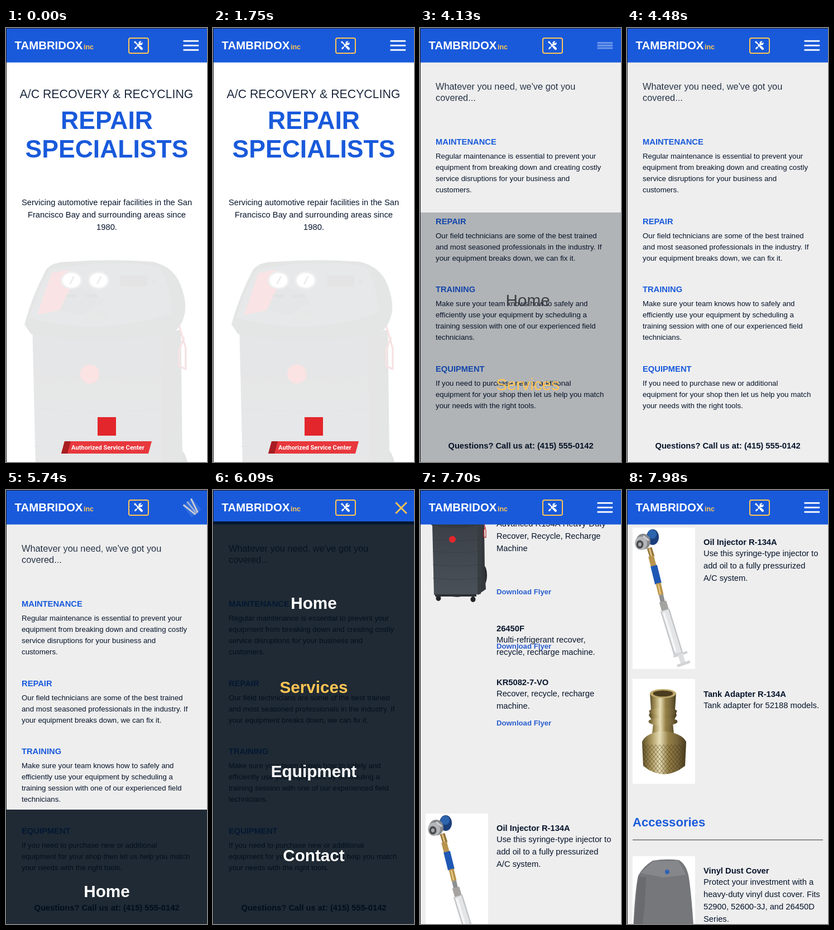
An HTML page with a canvas for the animation above (8 s loop, 360 by 774 pixels).

```html
<!DOCTYPE html>
<html lang="en">
<head>
<meta charset="utf-8">
<title>Mobile site menu</title>
<style>
html, body { margin: 0; width: 100%; height: 100%; overflow: hidden; background: #fff; }
canvas { display: block; width: 360px; height: 774px; }
</style>
</head>
<body>
<canvas id="stage"></canvas>
<script>
const W = 360, H = 774, LOOP = 8000, STEP = 70;
const BLUE = '#195adb', GOLD = '#ffc555', INK = '#06142b', PALE = '#eeeeee', RED = '#e3262c', EDGE = '#1c1c1e';
const HEADER = 61.5, MENU_TOP = 56, BODY = 14.72;
const SANS = '"Liberation Sans", Arial, sans-serif';
const PHONE = ['(415)', '555-0142'];

const canvas = document.getElementById('stage');
const dpr = window.devicePixelRatio || 1;
canvas.width = W * dpr;
canvas.height = H * dpr;
let g = canvas.getContext('2d');

// ---------- helpers ----------
const clamp = v => Math.max(0, Math.min(1, v));
const lerp = (a, b, u) => a + (b - a) * u;

// cubic-bezier(.25, .1, .25, 1)
function ease(x) {
  if (x <= 0) return 0;
  if (x >= 1) return 1;
  const bez = (a, b, s) => 3 * a * s * (1 - s) ** 2 + 3 * b * s * s * (1 - s) + s ** 3;
  let lo = 0, hi = 1;
  for (let i = 0; i < 24; i++) {
    const mid = (lo + hi) / 2;
    if (bez(0.25, 0.25, mid) < x) lo = mid; else hi = mid;
  }
  return bez(0.1, 1, lo);
}

function text(s, x, y, { size = BODY, color = INK, bold = false, align = 'left', font = SANS, thin = null } = {}) {
  g.font = `${bold ? 'bold ' : ''}${size}px ${font}`;
  g.textAlign = align;
  g.fillStyle = color;
  g.fillText(s, x, y);
  if (thin) { // shave the outline for a light weight
    g.strokeStyle = thin;
    g.lineWidth = 0.22;
    g.lineJoin = 'round';
    g.strokeText(s, x, y);
  }
}

function lines(list, x, y, gap, opt) {
  list.forEach((s, i) => text(s, x, y + i * gap, opt));
}

function rect(x, y, w, h, color) {
  g.fillStyle = color;
  g.fillRect(x, y, w, h);
}

function poly(color, ...p) {
  g.beginPath();
  for (let i = 0; i < p.length; i += 2) g.lineTo(p[i], p[i + 1]);
  g.closePath();
  g.fillStyle = color;
  g.fill();
}

function oval(x, y, rx, ry, color) {
  g.beginPath();
  g.ellipse(x, y, rx, ry, 0, 0, 7);
  g.fillStyle = color;
  g.fill();
}

function stroke(color, width, ...p) {
  g.beginPath();
  for (let i = 0; i < p.length; i += 2) g.lineTo(p[i], p[i + 1]);
  g.strokeStyle = color;
  g.lineWidth = width;
  g.stroke();
}

function box(x, y, w, h, r) {
  g.beginPath();
  g.roundRect(x, y, w, h, r);
}

function blend(x0, y0, x1, y1, ...colors) {
  const grad = g.createLinearGradient(x0, y0, x1, y1);
  colors.forEach((c, i) => grad.addColorStop(i / (colors.length - 1), c));
  return grad;
}

// ---------- pictures ----------
function heavyMachine() {
  oval(97, 135, 6, 17, '#26282b');
  poly('#34383c', 92, 45, 98, 43, 99, 128, 101, 160, 92, 166);
  poly(blend(0, 44, 0, 174, '#3a4046', '#434950', '#4b5158'), 5, 44, 94, 44, 92, 168, 50, 174, 8, 170);
  poly('#383d42', 86, 44, 94, 44, 92, 168, 86, 170);
  [71, 92, 116, 140].forEach(y => {
    g.beginPath();
    g.moveTo(6, y);
    g.quadraticCurveTo(48, y + 5, 92, y);
    g.strokeStyle = '#353a3f';
    g.lineWidth = 0.6;
    g.stroke();
  });
  g.beginPath();
  g.moveTo(0, 40);
  g.quadraticCurveTo(5, 22, 13, 7);
  g.quadraticCurveTo(16, 1, 28, 1);
  g.quadraticCurveTo(55, -1, 80, 1);
  g.quadraticCurveTo(95, 4, 99, 19);
  g.quadraticCurveTo(104, 34, 95, 44);
  g.quadraticCurveTo(50, 56, 4, 46);
  g.closePath();
  g.fillStyle = '#34393d';
  g.fill();
  g.beginPath();
  g.moveTo(3, 36);
  g.quadraticCurveTo(9, 17, 16, 6);
  g.quadraticCurveTo(50, -1, 84, 4);
  g.quadraticCurveTo(91, 14, 92, 33);
  g.quadraticCurveTo(48, 48, 3, 36);
  g.fillStyle = '#4b5055';
  g.fill();
  poly('#d62b2f', 17, 8, 27, 6, 30, 15, 37, 23, 28, 30, 8, 34);
  poly('#3c4146', 30, 15, 44, 20, 50, 26, 37, 34, 22, 31);
  [29.5, 46.5].forEach(x => {
    oval(x, 12.6, 6.8, 5.6, '#84888c');
    oval(x, 12.6, 5.6, 4.6, '#ffffff');
    stroke('#444', 0.7, x - 1, 15, x + 1.5, 10);
  });
  rect(60, 9.5, 17, 7, '#2f3337');
  rect(80, 12, 2, 3, '#33383c');
  rect(26, 21.5, 7, 1.6, '#1d2023');
  rect(38, 21.5, 8, 1.6, '#1d2023');
  poly('#42474c', 41, 33, 45, 31, 52, 31, 51, 36, 38, 37);
  g.lineJoin = 'round';
  stroke('#c3262a', 1.2, 97, 41, 101, 55, 101, 68, 97, 66, 97, 56, 100, 48);
  oval(41, 71, 6, 6, RED);
  oval(16, 176, 4.5, 5, '#222427');
  oval(78, 178, 4.5, 5, '#222427');
  rect(10, 169, 74, 4, '#2c3034');
}

// pre-rendered so it fades as one picture
const ghost = document.createElement('canvas');
ghost.width = W * dpr;
ghost.height = H * dpr;
{
  const main = g;
  g = ghost.getContext('2d');
  g.scale(dpr, dpr);
  g.translate(33, 414);
  g.scale(2.86, 2.86);
  heavyMachine();
  g = main;
}

function slimMachine() {
  oval(104, 378, 9, 15, '#1d1f21');
  oval(106, 378, 4, 7, '#5a5d60');
  poly(blend(22, 0, 101, 0, '#6d7176', '#96999e', '#8d9196', '#74787d'),
    25, 288, 96, 282, 101, 300, 102, 345, 97, 390, 78, 406, 27, 396, 21, 345);
  poly('#23262a', 30, 298, 68, 299, 75, 325, 71, 352, 80, 404, 27, 396, 33, 352, 28, 325);
  poly('#2a2d31', 25, 291, 37, 261, 58, 257, 94, 259, 108, 281, 100, 291, 74, 300, 26, 298);
  poly('#55595e', 40, 264, 88, 262, 97, 282, 72, 290, 32, 288);
  poly('#2c2f33', 62, 266, 86, 265, 92, 280, 64, 284);
  poly('#c52b2f', 41, 265, 60, 264, 57, 284, 34, 287);
  oval(47, 270, 4, 3.4, '#fff');
  oval(55, 269, 3.6, 3.2, '#fff');
  oval(45, 294, 3, 3, RED);
  poly(blend(37, 0, 62, 0, '#b9bdc1', '#ffffff', '#a3a7ab'), 37, 317, 62, 316, 60, 339, 53, 343, 42, 341);
  stroke('#53575c', 1, 34, 352, 71, 356);
  stroke('#53575c', 1, 32, 366, 73, 372);
  [30, 77].forEach((x, i) => {
    rect(x - 7, 396 + i * 5, 14, 4, '#2a2c2f');
    oval(x, 406 + i * 5, 5, 6, '#1f2123');
  });
  oval(98, 398, 4, 5, '#1f2123');
}

function injector() {
  rect(10, 67, 112, 252, '#fff');
  oval(46, 84, 11, 14, '#1b3f7c');
  oval(45, 79, 8, 8, '#2c64ad');
  oval(29, 92, 13, 14, '#85888b');
  oval(25, 95, 11, 12, '#b4b6b8');
  oval(23, 97, 6.5, 7.5, '#4a4c4f');
  oval(23, 97, 3, 3.5, '#a5a7a9');
  stroke('#cfd1d3', 3, 29, 82, 39, 90);
  stroke('#94733a', 9, 40, 103, 45, 119);
  stroke('#dcc080', 3, 40, 104, 44, 118);
  stroke('#b8954d', 10, 43, 118, 48, 137);
  stroke('#1f58b4', 12, 48, 135, 56, 167);
  stroke('#b8924a', 9, 56, 166, 61, 187);
  stroke('#e2c47c', 3, 56, 168, 60, 186);
  stroke('#8d8f92', 8, 61, 187, 64, 200);
  stroke('#a5a39f', 13, 64, 199, 69, 216);
  stroke('#c4c7ca', 17, 68, 214, 92, 292);
  stroke('#e3e5e7', 12, 68, 215, 92, 291);
  stroke('#f5f6f6', 4, 66, 219, 87, 288);
  stroke('#cfd1d4', 4, 83, 297, 108, 289);
  stroke('#dcdee0', 9, 95, 292, 101, 310);
  stroke('#d2d4d6', 5, 90, 314, 113, 306);
}

function adapter() {
  rect(10, 337, 112, 187, '#fff');
  const brass = (a, b) => blend(a, 0, b, 0, '#5d4f29', '#a8955c', '#e8deb6', '#947f46', '#77653a', '#483c1e');
  poly(brass(41, 88), 41, 362, 88, 362, 86, 392, 89, 402, 82, 414, 84, 436, 45, 436, 47, 414, 39, 402, 43, 392);
  oval(64.5, 363, 23.5, 8, '#bfa96c');
  oval(64.5, 363, 18, 5.5, '#4b3d1f');
  oval(64.5, 395, 25, 7, brass(39, 90));
  oval(64.5, 413, 26, 7, brass(38, 91));
  g.beginPath();
  g.moveTo(27, 449);
  g.quadraticCurveTo(34, 433, 64, 430);
  g.quadraticCurveTo(98, 433, 106, 449);
  g.lineTo(104, 492);
  g.quadraticCurveTo(66, 522, 29, 492);
  g.closePath();
  g.fillStyle = brass(27, 106);
  g.fill();
  g.save();
  g.clip();
  for (let x = -40; x < 150; x += 7) {
    stroke('rgba(62,46,16,.5)', 1, x, 454, x + 50, 514);
    stroke('rgba(62,46,16,.5)', 1, x + 50, 454, x, 514);
  }
  g.restore();
}

function cover() {
  rect(10, 653, 112, 190, '#fff');
  g.beginPath();
  g.moveTo(10, 810);
  g.quadraticCurveTo(13, 720, 20, 688);
  g.quadraticCurveTo(28, 672, 46, 661);
  g.quadraticCurveTo(70, 657, 93, 660);
  g.quadraticCurveTo(107, 668, 111, 692);
  g.quadraticCurveTo(117, 735, 121, 810);
  g.closePath();
  g.fillStyle = '#75777b';
  g.fill();
  poly('#85878b', 24, 683, 47, 662, 92, 661, 106, 686, 66, 691);
  poly('#696b6f', 20, 690, 34, 690, 32, 740, 24, 810, 10, 810);
  oval(72, 681, 4, 4, '#2f63b5');
}

// ---------- pages ----------
function home() {
  rect(0, 0, W, H, '#fff');
  g.globalAlpha = 0.125;
  g.drawImage(ghost, 0, 0, W, H);
  g.globalAlpha = 1;
  const mid = { align: 'center' };
  text('A/C RECOVERY & RECYCLING', 180, 125, { ...mid, size: 21.3, thin: '#fff' });
  const title = { ...mid, size: 44.5, bold: true, color: BLUE };
  text('REPAIR', 180.5, 180, title);
  text('SPECIALISTS', 180.5, 231, title);
  lines(['Servicing automotive repair facilities in the San',
    'Francisco Bay and surrounding areas since', '1980.'], 180.5, 316, 22, mid);
  rect(164, 694, 33, 33, RED);
  poly('#e8383d', 105, 737, 261, 737, 255, 759, 99, 759);
  poly('#a81e22', 105, 737, 116, 737, 110, 759, 99, 759);
  text('Authorized Service Center', 182.5, 752, { ...mid, size: 11.1, bold: true, color: '#fff', font: 'Roboto, sans-serif' });
}

const topics = [
  [208, 'MAINTENANCE', 'Regular maintenance is essential to prevent your',
    'equipment from breaking down and creating costly', 'service disruptions for your business and', 'customers.'],
  [350, 'REPAIR', 'Our field technicians are some of the best trained',
    'and most seasoned professionals in the industry. If', 'your equipment breaks down, we can fix it.'],
  [471, 'TRAINING', 'Make sure your team knows how to safely and',
    'efficiently use your equipment by scheduling a', 'training session with one of our experienced field', 'technicians.'],
  [613, 'EQUIPMENT', 'If you need to purchase new or additional',
    'equipment for your shop then let us help you match', 'your needs with the right tools.']
];

function services() {
  rect(0, 0, W, H, PALE);
  lines(["Whatever you need, we've got you", 'covered...'], 28, 110, 19.5, { size: 16.35, thin: PALE });
  for (const [y, head, ...body] of topics) {
    text(head, 28, y, { bold: true, color: BLUE });
    lines(body, 28, y + 25, 20, { size: 13.25 });
  }
  text('Questions? Call us at: ' + PHONE.join(' '), 180.5, 750, { bold: true, align: 'center' });
}

function item(y, name, body, flyer) {
  text(name, 137, y, { bold: true });
  lines(body, 137, y + 19.5, 22, {});
  if (flyer) text('Download Flyer', 137, flyer, { size: 13.2, bold: true, color: '#2a5fd0' });
}

function section(name, y) {
  text(name, 10, y, { size: 22.1, bold: true, color: BLUE });
  rect(10, y + 23.5, 341, 2, '#8c8c8c');
}

const SCROLL = 940;

function equipment(t) {
  const u = clamp((t - 7600) / 380);
  rect(0, 0, W, H, PALE);
  g.save();
  g.translate(0, -Math.round(SCROLL * (1 - (1 - u) ** 2)));
  box(27.5, 79, 306, 76, 22);
  g.fillStyle = BLUE;
  g.fill();
  lines(['Give us a call to inquire about', 'pricing, financing options, and', 'to place an order.'],
    134, 105, 15, { size: 12.5, color: GOLD, align: 'center' });
  lines(PHONE, 285, 113, 17, { bold: true, color: GOLD, align: 'center' });
  section('A/C Machines', 202);
  slimMachine();
  item(286, '52619KE', ['Premier R-134A refrigerant', 'recovery, recycling, and', 'recharging machine.'], 409);
  g.save();
  g.translate(17, 447);
  heavyMachine();
  g.restore();
  item(475, '52731TB', ['Advanced R134A Heavy-Duty', 'Recover, Recycle, Recharge', 'Machine'], 616);
  item(682, '26450F', ['Multi-refrigerant recover,', 'recycle, recharge machine.'], 713);
  item(778, 'KR5082-7-VO', ['Recover, recycle, recharge', 'machine.'], 850);

  g.translate(0, SCROLL);
  injector();
  item(98, 'Oil Injector R-134A', ['Use this syringe-type injector to', 'add oil to a fully pressurized', 'A/C system.']);
  adapter();
  item(369, 'Tank Adapter R-134A', ['Tank adapter for 52188 models.']);
  section('Accessories', 599.5);
  cover();
  item(684, 'Vinyl Dust Cover', ['Protect your investment with a', 'heavy-duty vinyl dust cover. Fits', '52900, 52600-3J, and 26450D', 'Series.']);
  g.restore();
}

// ---------- header and menu ----------
// head: time already spent in the slide at the first visible step
const moves = [
  { at: 2240, open: true, head: 78 },
  { at: 4130, open: false, head: 95, icon: 120 },
  { at: 5740, open: true, head: 78 },
  { at: 7350, open: false, head: 38, icon: 0 }
];

function bars(gap, tilt, midAlpha, color) {
  g.strokeStyle = color;
  g.lineWidth = 2.8;
  const alpha = g.globalAlpha;
  for (const i of [-1, 0, 1]) {
    g.save();
    g.globalAlpha = i ? alpha : alpha * midAlpha;
    g.translate(0, i * gap);
    g.rotate(-i * tilt);
    g.beginPath();
    g.moveTo(-13.8, 0);
    g.lineTo(13.8, 0);
    g.stroke();
    g.restore();
  }
}

function menuIcon(move, t) {
  g.save();
  const dt = move ? t - move.at : 0;
  if (move && move.open) {
    const p = ease((dt + move.head) / 400);
    const busy = 4 * p * (1 - p);
    g.translate(lerp(331.3, 337, p), lerp(31.2, 32, p));
    g.rotate(Math.PI * p);
    rect(-13, -11, 26, 22, `rgba(255,255,255,${0.13 * busy})`);
    g.globalAlpha = 1 - 0.3 * busy;
    bars(8 * (1 - p), Math.PI / 4 * p, 1 - p, `rgb(255,${lerp(255, 197, p)},${lerp(255, 85, p)})`);
  } else {
    const k = move ? clamp((dt + move.icon) / 350) : 1;
    const gap = 8 * (0.4 + 0.6 * k);
    g.translate(331.3, 31.2);
    if (k < 1) rect(-13.8, -gap, 27.6, 2 * gap, `rgba(255,255,255,${0.12 * (1 - k)})`);
    g.globalAlpha = k;
    bars(gap, 0, 1, '#fff');
  }
  g.restore();
}

function header(move, t) {
  rect(0, 0, W, HEADER, BLUE);
  text('TAMBRIDOX', 15.5, 38, { size: 20.4, bold: true, color: '#fff' });
  text('inc', 139, 38, { size: 12.4, bold: true, color: GOLD });
  box(220, 18, 35, 27, 3);
  g.strokeStyle = GOLD;
  g.lineWidth = 2;
  g.stroke();
  // crossed wrench and screwdriver
  g.lineCap = 'round';
  stroke('#fff', 2.8, 231.5, 36.5, 240, 28);
  oval(241, 27, 3.6, 3.6, '#fff');
  stroke(BLUE, 2, 241.8, 26.2, 245, 23);
  stroke(BLUE, 1.2, 232, 31, 237, 36);
  stroke('#fff', 1.8, 231.5, 25.5, 238, 32);
  stroke('#fff', 3, 230.8, 25, 232, 26);
  stroke('#fff', 4, 239.5, 33.5, 243, 37);
  g.lineCap = 'butt';
  menuIcon(move, t);
}

const links = ['Home', 'Services', 'Equipment', 'Contact'];

// how strongly each link is highlighted
function glow(i, t) {
  const a = clamp((t - 3710) / 210), b = clamp((t - 7070) / 140);
  return [1 - a, a * (1 - b), b, 0][i];
}

function menu(move, t) {
  if (!move) return;
  const time = t - move.at + move.head;
  const slide = ease(time / 400);
  const away = move.open ? 1 - slide : slide;
  if (away >= 1) return;
  const fade = move.open ? 1 : 1 - ease(time / 230);
  const top = MENU_TOP + Math.round(away * (H - MENU_TOP));
  rect(0, top, W, H - top, `rgba(1,13,25,${0.87 * fade})`);
  const drift = move.open ? 0 : away;
  const rest = move.open ? [255, 255, 255] : [62, 64, 67];
  links.forEach((name, i) => {
    const tone = [255, 197, 85].map((c, n) => Math.round(lerp(rest[n], c, glow(i, t))));
    text(name, 180.5 + 33 * drift, 212 + 150 * i + top - MENU_TOP + 28 * drift,
      { size: 29.7, bold: move.open, align: 'center', color: `rgb(${tone})` });
  });
}

function draw(now) {
  const t = Math.floor((now % LOOP) / STEP) * STEP;
  const move = moves.filter(m => m.at <= t).pop();
  g.setTransform(dpr, 0, 0, dpr, 0, 0);
  g.textBaseline = 'alphabetic';
  if (t < moves[1].at) home();
  else if (t < moves[3].at) services();
  else equipment(t);
  header(move, t);
  menu(move, t);
  rect(0, 0, 1, H, EDGE);
  rect(0, 0, W, 1, EDGE);
}

const start = performance.now();
function tick() {
  draw(performance.now() - start);
  requestAnimationFrame(tick);
}
tick();
</script>
</body>
</html>
```
